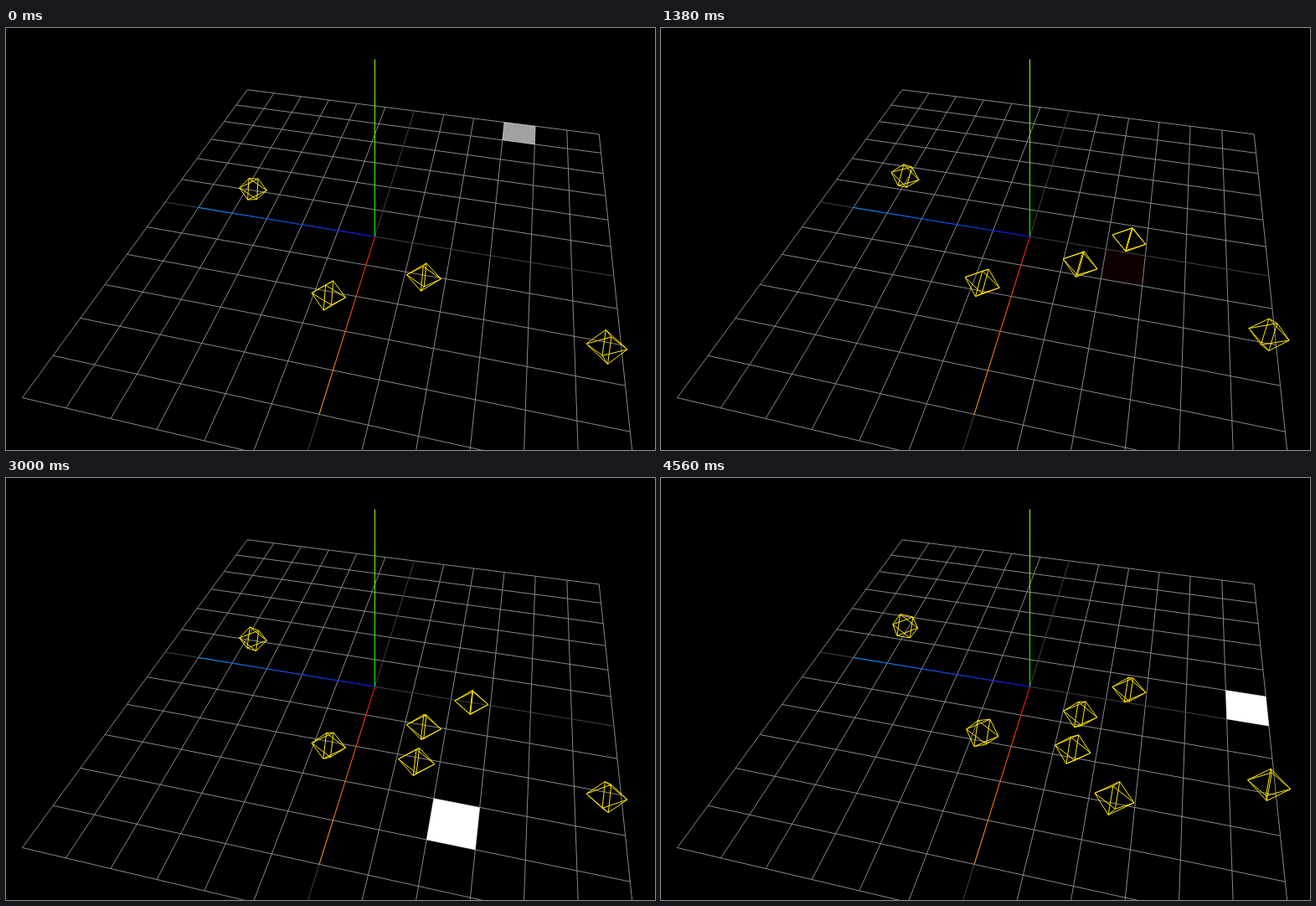
Recreate the animation shown at these times as an HTML page with a canvas. Size 775x504 px, loop 4.62 s.

```html
<!DOCTYPE html>
<html lang="en">
<head>
<meta charset="utf-8">
<title>Grid placement</title>
<style>
  html, body { margin: 0; width: 100%; height: 100%; overflow: hidden; background: #000; }
  canvas { display: block; }
</style>
</head>
<body>
<canvas id="stage" width="775" height="504"></canvas>
<script>
const canvas = document.getElementById('stage');
const ctx = canvas.getContext('2d');
const LOOP = 4620, STEP = 60;
const HALF = 6, AXIS = 5, RADIUS = 0.4;

// Orbit camera looking at the world origin
const CX = 440.5, CY = 249.2, FOCAL = 637.3, DIST = 13.98;
const ELEVATION = 0.8117, AZIMUTH = -0.2234;
const SIN_E = Math.sin(ELEVATION), COS_E = Math.cos(ELEVATION);
const SIN_A = Math.sin(AZIMUTH), COS_A = Math.cos(AZIMUTH);

// Pointer stops: cell and the time of leaving it
const STOPS = [
  { x: -6, z: -4, leave: 0 },
  { x: 0, z: -3, leave: 1500 },
  { x: 2, z: -2, leave: 2520 },
  { x: 3, z: -3, leave: 3900 },
  { x: -1, z: -6, leave: LOOP }
];
const TRAVEL = 360, CLICK_LEAD = 480;

// Octahedra there from the start, then one clicked at each inner stop
const OBJECTS = [
  { x: -1, z: 3, born: 0 }, { x: 2, z: 0, born: 0 },
  { x: 1, z: -2, born: 0 }, { x: 2, z: -6, born: 0 },
  ...STOPS.slice(1, -1).map(s => ({ x: s.x, z: s.z, born: s.leave - CLICK_LEAD }))
];

// Scene clock in seconds; it starts slightly slow
const sceneTime = t => 5 * Math.PI + 0.016 + t / 937.5 + 0.065 * Math.exp(-t / 300);

function project([x, y, z]) {
  const q = x * COS_A + z * SIN_A;
  const k = FOCAL / (DIST - COS_E * q - SIN_E * y);
  return [
    CX + k * (x * SIN_A - z * COS_A),
    CY - k * (COS_E * y - SIN_E * q)
  ];
}

function line(a, b, style) {
  ctx.strokeStyle = style;
  ctx.beginPath();
  ctx.moveTo(...project(a));
  ctx.lineTo(...project(b));
  ctx.stroke();
}

function drawGrid() {
  for (let i = -HALF; i <= HALF; i++) {
    const color = i ? '#888' : '#444';
    line([i, 0, -HALF], [i, 0, HALF], color);
    line([-HALF, 0, i], [HALF, 0, i], color);
  }
}

// Pure colour at the origin, mixed with the next channel at the tip
function drawAxis(axis, mixed) {
  const at = u => [0, 1, 2].map(i => i === axis ? AXIS * u : 0);
  const a = project(at(0)), b = project(at(1));
  const gap = p => Math.hypot(p[0] - a[0], p[1] - a[1]);
  const grad = ctx.createLinearGradient(...a, ...b);
  for (let u = 0; u <= 1; u += 0.25) {
    const rgb = [0, 1, 2].map(i => i === axis ? 255 : i === mixed ? 153 * u : 0);
    grad.addColorStop(Math.min(1, gap(project(at(u))) / gap(b)), `rgb(${rgb})`);
  }
  line(at(0), at(1), grad);
}

// Curved glide between stops, snapped to cells
function pointerCell(t) {
  const i = STOPS.findIndex(s => t < s.leave);
  const from = STOPS[i - 1], to = STOPS[i];
  const k = Math.min(1, (t - from.leave) / TRAVEL);
  return {
    x: Math.round(from.x + (to.x - from.x) * k),
    z: Math.round(from.z + (to.z - from.z) * k * k)
  };
}

function drawPointer(t, time) {
  const { x, z } = pointerCell(t);
  const taken = OBJECTS.some(o => o.x === x && o.z === z && t >= o.born);
  ctx.globalAlpha = Math.min(1, 1 + Math.sin(time * 1000 / 120));
  ctx.fillStyle = taken ? '#f00' : '#fff';
  ctx.beginPath();
  for (let i = 0; i < 4; i++) {
    ctx.lineTo(...project([x + (i % 3 > 0), 0, z + (i > 1)]));
  }
  ctx.fill();
  ctx.globalAlpha = 1;
}

function drawObject({ x, z }, time) {
  const c = Math.cos(time), s = Math.sin(time);
  const center = [x + 0.5, 0.5 + 0.5 * Math.abs(s), z + 0.5];
  // Unit axes turned about z, then about x
  const axes = [[c, s * c, s * s], [-s, c * c, c * s], [0, -s, c]];
  const tip = (i, sign) => center.map((v, k) => v + axes[i % 3][k] * sign * RADIUS);
  for (let i = 0; i < 3; i++) {
    for (const p of [-1, 1]) {
      for (const q of [-1, 1]) line(tip(i, p), tip(i + 1, q), '#ffea00');
    }
  }
}

function draw(t) {
  const time = sceneTime(t);
  ctx.fillStyle = '#000';
  ctx.fillRect(0, 0, canvas.width, canvas.height);
  drawGrid();
  drawPointer(t, time);
  drawAxis(0, 1);
  drawAxis(1, 0);
  drawAxis(2, 1);
  for (const o of OBJECTS) if (t >= o.born) drawObject(o, time);
}

const start = performance.now();
function tick() {
  const t = (performance.now() - start) % LOOP;
  draw(Math.floor(t / STEP) * STEP);
  requestAnimationFrame(tick);
}
tick();
</script>
</body>
</html>
```
